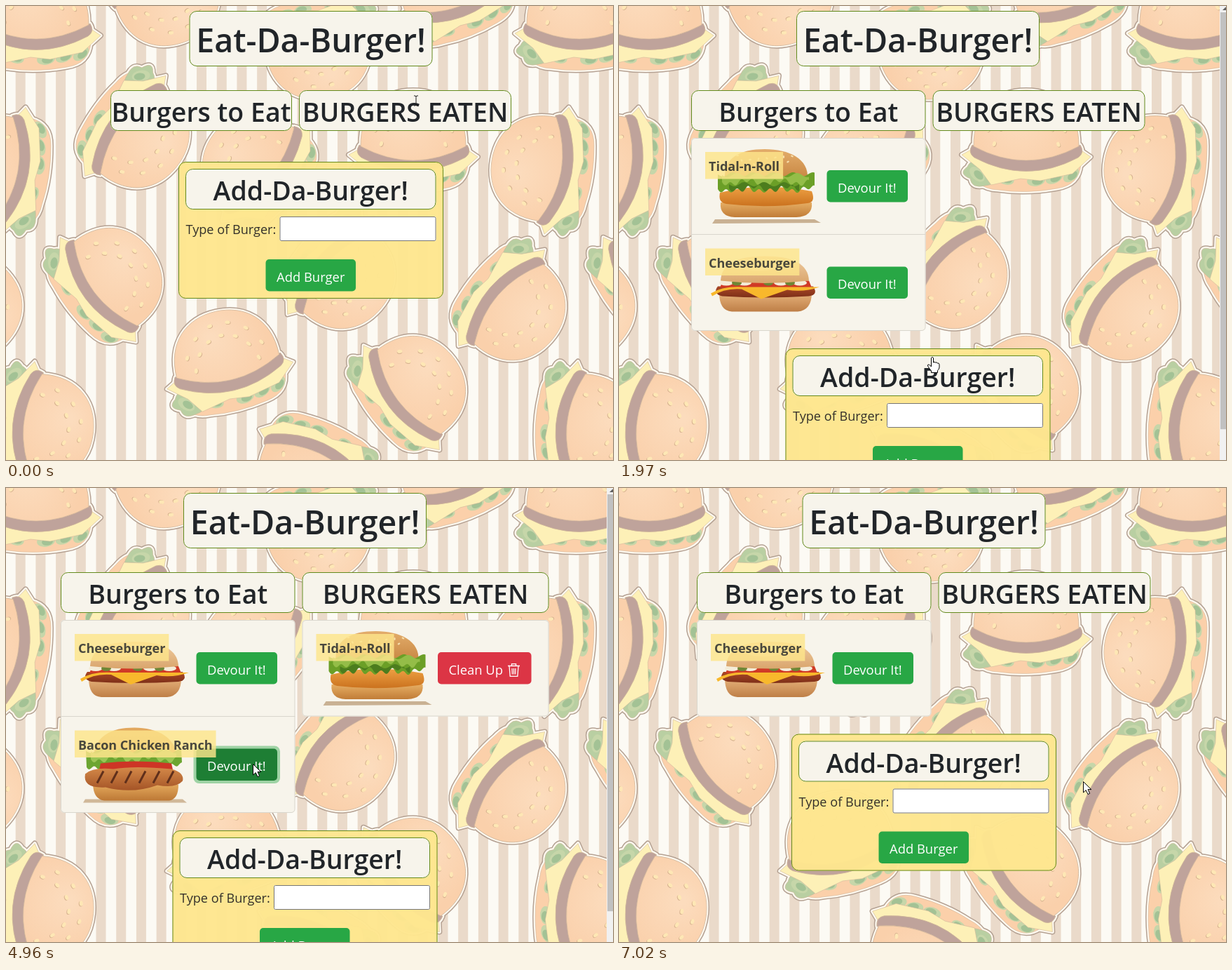
Recreate the animation shown at these times as an HTML page with a canvas. Size 866 px wide and 647 px high, loop 7280 ms.

```html
<!DOCTYPE html>
<html lang="en">
<head>
<meta charset="utf-8">
<title>Eat-Da-Burger!</title>
<style>
html, body { margin: 0; width: 100%; height: 100%; overflow: hidden; background: #fcfaf4; }
canvas { display: block; }
</style>
</head>
<body>
<canvas id="stage" width="866" height="647"></canvas>
<script>
const W = 866, H = 647, LOOP = 7280, TILE = 775;
const FONT = '"Open Sans", "Noto Sans", sans-serif';
const PAPER = '#f7f4eb', OLIVE = '#638a1c';
const NAMES = { F: 'Tidal-n-Roll', C: 'Cheeseburger', B: 'Bacon Chicken Ranch' };

// time, cursor, x, y, burgers to eat, burgers eaten, typed text, pressed button
const STEPS = [
  [0, 'beam', 585, 135, '', ''],
  [250, 'beam', 500, 318, '', '', 'Tidal'],
  [490, 'beam', 500, 318, '', '', NAMES.F],
  [740, 'hand', 449, 393, '', '', NAMES.F, 'add'],
  [1190, 'hand', 447, 398, 'F', ''],
  [1440, 'beam', 500, 447, 'F', '', NAMES.C],
  [1690, 'hand', 447, 519, 'F', '', NAMES.C, 'add'],
  [1970, 'hand', 447, 500, 'FC', ''],
  [2460, 'hand', 445, 632, 'FC', '', NAMES.B, 'add'],
  [2750, 'hand', 445, 632, 'FCB', ''],
  [2960, 'arrow', 423, 579, 'FCB', ''],
  [3450, 'hand', 352, 258, 'FCB', ''],
  [3710, 'hand', 347, 246, 'FCB', '', '', 'F'],
  [3980, 'hand', 346, 243, 'CB', 'F'],
  [4230, 'hand', 349, 290, 'CB', 'F'],
  [4480, 'hand', 352, 350, 'CB', 'F'],
  [4720, 'hand', 353, 388, 'CB', 'F'],
  [4960, 'arrow', 352, 393, 'CB', 'F', '', 'B'],
  [5220, 'arrow', 352, 393, 'C', 'FB'],
  [5490, 'hand', 669, 264, 'C', 'FB', '', 'F'],
  [5740, 'hand', 669, 268, 'C', 'B'],
  [6000, 'hand', 669, 270, 'C', 'B'],
  [6250, 'hand', 669, 271, 'C', 'B', '', 'B'],
  [6500, 'arrow', 667, 273, 'C', ''],
  [6750, 'arrow', 668, 317, 'C', ''],
  [7020, 'arrow', 662, 418, 'C', '']
];

const stage = document.getElementById('stage');
const wall = document.createElement('canvas');
wall.width = W;
wall.height = H;
let g = wall.getContext('2d');

function shape(color, d, line, width = 1) {
  const path = new Path2D(d);
  if (color) { g.fillStyle = color; g.fill(path); }
  if (line) { g.strokeStyle = line; g.lineWidth = width; g.stroke(path); }
}

function dot(color, x, y, rx, ry = rx, turn = 0) {
  g.fillStyle = color;
  g.beginPath();
  g.ellipse(x, y, rx, ry, turn, 0, 7);
  g.fill();
}

function box(x, y, w, h, r, color, line) {
  g.beginPath();
  g.roundRect(x, y, w, h, r);
  g.fillStyle = color;
  g.fill();
  if (!line) return;
  g.strokeStyle = line;
  g.lineWidth = 1;
  g.beginPath();
  g.roundRect(x + .5, y + .5, w - 1, h - 1, r);
  g.stroke();
}

function text(str, x, y, size, weight = 400, color = '#212529', align = 'left') {
  g.font = `${weight} ${size}px ${FONT}`;
  g.textAlign = align;
  g.fillStyle = color;
  g.fillText(str, x, y);
}

function at(x, y, draw, turn = 0) {
  g.save();
  g.translate(x, y);
  g.rotate(turn * Math.PI / 180);
  draw();
  g.restore();
}

// ---- wallpaper ----
const LAYERS = [
  ['#fbd0aa', 'M-80 12Q-74 46-40 47Q0 53 44 45Q76 40 78 10Z'],
  ['#b9cfa2', 'M-64 2Q-80 4-84 14Q-98 24-80 31Q-78 46-58 41Q-42 40-46 24Z'],
  ['#fdf0b7', 'M-92-3L-70-15Q0 18 70-15L92 0L66 24L20 34L-8 31L-50 40L-66 18Z'],
  ['#bfa39b', 'M-77-17Q0 25 77-17Q84-6 74 1Q0 40-74 1Q-84-6-77-17Z'],
  ['#fad0ab', 'M-75-15C-76-68-42-95 0-95S76-68 75-15Q0 25-75-15Z']
];

function wallBurger() {
  g.lineJoin = 'round';
  for (const [, d] of LAYERS) shape(null, d, '#b4a193', 8);
  for (const [, d] of LAYERS) shape(null, d, '#fffaf0', 5);
  LAYERS.forEach(([color, d], i) => {
    shape(color, d, '#cdb399', i > 2 ? .8 : .5);
    if (i === 1) for (const x of [-70, -30, 14, 40, 64]) {
      const y = 36 - Math.abs(x) * .16;
      dot('#c6d6a9', x, y, 13, 8, -x / 90);
      dot('#a3c295', x + 2, y + 1, 8, 5, -x / 90);
    }
  });
  const glow = g.createRadialGradient(-15, -60, 5, -10, -45, 75);
  glow.addColorStop(0, '#fcdcbd');
  glow.addColorStop(1, '#fcdcbd00');
  shape(glow, LAYERS[4][1]);
  for (let i = 0; i < 13; i++) {
    const a = Math.PI * (1.1 + i * .067), r = i % 2 ? 78 : 60;
    dot('#d8b391', Math.cos(a) * r * .8 + .7, Math.sin(a) * r + .8, 2.6, 3.8, a);
    dot('#fee7b5', Math.cos(a) * r * .8, Math.sin(a) * r, 2.5, 3.7, a);
  }
}

function paintWall() {
  g.fillStyle = '#fcfaf4';
  g.fillRect(0, 0, W, H);
  g.fillStyle = '#eadaca';
  for (let x = -15; x < W; x += TILE / 27) g.fillRect(x, 0, 14, H);
  const spots = [
    [43, 42, 0], [222, -38, 160], [645, -4, -20], [442, 38, 172], [169, 170, 128],
    [12, 235, -80], [372, 240, -48], [581, 215, 0], [462, 370, 131], [130, 405, 53],
    [706, 415, 131], [320, 528, -13], [563, 559, 53], [30, 598, 95], [445, 642, 205]
  ];
  for (const [x, y, turn] of spots)
    for (const shift of [-TILE, 0, TILE]) at(x + shift, y, wallBurger, turn);
}

// ---- food ----
function leaf(x, y, w, h, color) {
  g.beginPath();
  for (let i = 0; i <= w; i += 2) g.lineTo(x + i, y + 3 * Math.sin(i * .22));
  for (let i = w; i >= 0; i -= 2) g.lineTo(x + i, y + h + 3 * Math.sin(i * .4) + 3 * Math.sin(i * .13));
  g.fillStyle = color;
  g.fill();
}

function shade(top, y0, low, y1) {
  const s = g.createLinearGradient(0, y0, 0, y1);
  s.addColorStop(0, top);
  s.addColorStop(1, low);
  return s;
}

function seeds(y) {
  for (let i = 0; i < 14; i++)
    dot('#f7dfad', 66 + i * 6, y + 7 + i * 7 % 15, 2, 1.2, i);
}

const FOOD = {
  F() {
    shape('#c9b193', 'M34 116H176L185 121L30 122Z');
    shape(shade('#edb76c', 88, '#bf7a35', 114), 'M42 92H172Q174 112 150 113H62Q40 112 42 92Z');
    shape(shade('#eda043', 70, '#cc7420', 96), 'M41 78Q100 62 172 76Q178 92 166 93Q108 101 50 94Q38 92 41 78Z');
    shape(shade('#e3ad6b', 16, '#c78541', 60), 'M48 58C46 28 70 16 105 16S168 30 166 58Z');
    seeds(18);
    leaf(38, 52, 138, 21, '#6b9f27');
    leaf(44, 53, 124, 10, '#94bd48');
    leaf(54, 66, 100, 6, '#4c7d1e');
  },
  C() {
    shape(shade('#e6b27b', 83, '#bd7d45', 111), 'M40 83H172Q172 108 152 110H58Q40 109 40 83Z');
    shape(shade('#b04a28', 72, '#7d2f18', 90), 'M38 74H174Q182 86 168 88Q105 92 44 88Q30 84 38 74Z');
    shape('#d03a26', 'M45 66Q105 60 168 66L172 76H41Z');
    for (const x of [50, 76, 128, 155]) dot('#f4ecd8', x, 69, 10, 4);
    for (const x of [65, 110, 141]) dot('#6e8635', x, 69, 7, 4);
    shape('#f8b82c', 'M28 84Q45 73 75 75H150L183 75Q160 83 137 79L100 92L72 78Q48 76 30 88Z');
    shape(shade('#f0cda2', 31, '#d9a56c', 70), 'M42 66C43 42 65 31 105 31S167 42 168 66Q105 73 42 66Z');
    dot('#f8dfbd88', 96, 43, 34, 9);
  },
  B() {
    shape('#d0b899', 'M35 118H174L180 123H32Z');
    shape(shade('#e5aa5d', 96, '#b97432', 122), 'M46 97H168Q168 118 155 120H62Q47 118 46 97Z');
    shape(shade('#e3a95f', 16, '#ca853d', 60), 'M47 59C48 28 72 16 105 16S165 30 166 59Z');
    leaf(36, 49, 137, 22, '#6ca531');
    leaf(43, 50, 122, 11, '#9bc556');
    shape('#cd3526', 'M57 67Q105 61 158 67L160 76H55Z');
    shape(shade('#d58a49', 72, '#a65628', 104), 'M35 82Q46 72 75 75Q105 70 158 75Q177 80 174 92Q164 103 138 98Q102 111 64 101Q31 103 35 82Z');
    for (let x = 52; x < 165; x += 20) shape(null, `M${x + 9} 78L${x} 95`, '#5f2f1b', 3);
  }
};

// ---- page ----
function heading(str, x, y, w) {
  box(x, y, w, 58, 10, PAPER, OLIVE);
  text(str, x + w / 2, y + 45, 37.5, 600, '#212529', 'center');
}

function button(str, x, y, w, pressed, red) {
  if (pressed) box(x - 4, y - 4, w + 8, 53.5, 8, red ? '#e1536180' : '#48b46180');
  const colors = red ? ['#dc3545', '#bd2130'] : ['#28a745', '#1e7e34'];
  box(x, y, w, 45.5, 5, colors[+pressed]);
  text(str, x + 15.5, y + 31.5, 18.4, 400, '#fff');
}

function bin() {
  shape(null, 'M0 3.5H17M5.5 3V.7H11.5V3M2 4L3.2 18.3H13.8L15 4M6 7L6.4 15.5M8.5 7V15.5M11 7L10.6 15.5', '#fff', 1.3);
}

function list(items, x, w, eaten, pressed) {
  if (!items) return;
  box(x, 188, w, 137.5 * items.length, 5, PAPER, '#d9d6cd');
  [...items].forEach((key, i) => at(x, 188 + i * 137.5, () => {
    if (i) { g.fillStyle = '#d9d6cd'; g.fillRect(0, -.5, w, 1); }
    FOOD[key]();
    button(eaten ? 'Clean Up' : 'Devour It!', 193.5, 46, eaten ? 133.5 : 115.5, pressed === key, eaten);
    if (eaten) at(293.5, 62, bin);
    g.globalAlpha = .82;
    g.font = `700 18px ${FONT}`;
    box(20, 20, g.measureText(NAMES[key]).width + 10, 38.5, 0, '#fee68c');
    text(NAMES[key], 25, 47, 18, 700);
    g.globalAlpha = 1;
  }));
}

function form(x, y, typed, pressed) {
  box(x, y, 378, 195, 10, '#fee78ff8', OLIVE);
  heading('Add-Da-Burger!', x + 10, y + 10, 357.5);
  text('Type of Burger:', x + 10.5, y + 103, 18.1, 400, '#33302a');
  box(x + 144.5, y + 78, 223, 35, 2, '#fff', typed ? '#111' : '#767676');
  if (typed) text(typed, x + 150, y + 102, 18.1);
  button('Add Burger', x + 124.5, y + 139, 128.5, pressed === 'add');
}

const CURSORS = {
  arrow: () => shape('#fff', 'M.5 .5V16L4.2 12.6L7 18.5L9.6 17.3L7 11.6H11.8Z', '#000'),
  hand: () => shape('#fff', 'M-1.5 1.5Q0-.8 1.5 1.5V8Q3 6.3 4.5 8.2Q6.2 7 7.3 9Q9.5 8.3 10 10.8V15Q9.5 18 7.5 19.5V22.5H-1.5V20Q-4 17-6.5 13Q-7 10.5-4.5 11L-1.5 14Z', '#000'),
  beam: () => shape(null, 'M-3-7H-1L0-6L1-7H3M0-6V6M-3 7H-1L0 6L1 7H3', '#222')
};

function scrollbar(pageHeight) {
  g.fillStyle = '#f1f1f1';
  g.fillRect(857, 0, 9, H);
  g.fillStyle = '#c1c1c1';
  g.fillRect(858, 9, 8, H * H / pageHeight - 9);
  shape('#606060', 'M861 6L865.5 1.5L866 2V6Z');
}

function paint(now) {
  const time = now % LOOP;
  const [, cursor, x, y, eat, eaten, typed, pressed] = STEPS.findLast(s => s[0] <= time);
  const leftW = eat ? 334.5 : 259, rightW = eaten ? 352 : 303;
  const formY = Math.max(222, eat && 213 + 137.5 * eat.length, eaten && 232.5 + 137.5 * eaten.length);
  const scrolls = formY > 450;
  const mid = scrolls ? 426.5 : 435;
  const left = Math.round(mid - (leftW + rightW + 10) / 2), right = left + leftW + 10;

  g.drawImage(wall, 0, 0);
  box(mid - 173.5, 7, 347, 79, 10, PAPER, OLIVE);
  text('Eat-Da-Burger!', mid, 66, 46.5, 600, '#212529', 'center');
  heading('Burgers to Eat', left, 120, leftW);
  heading('BURGERS EATEN', right, 120, rightW);
  list(eat, left, leftW, false, pressed);
  list(eaten, right, rightW, true, pressed);
  form(mid - 189, formY, typed, pressed);
  if (scrolls) scrollbar(formY + 206);
  at(x, y, CURSORS[cursor]);
  requestAnimationFrame(loop);
}

let start;
function loop(now) {
  start ??= now;
  paint(Math.max(0, now - start));
}

paintWall();
g = stage.getContext('2d');
paint(0);
</script>
</body>
</html>
```
